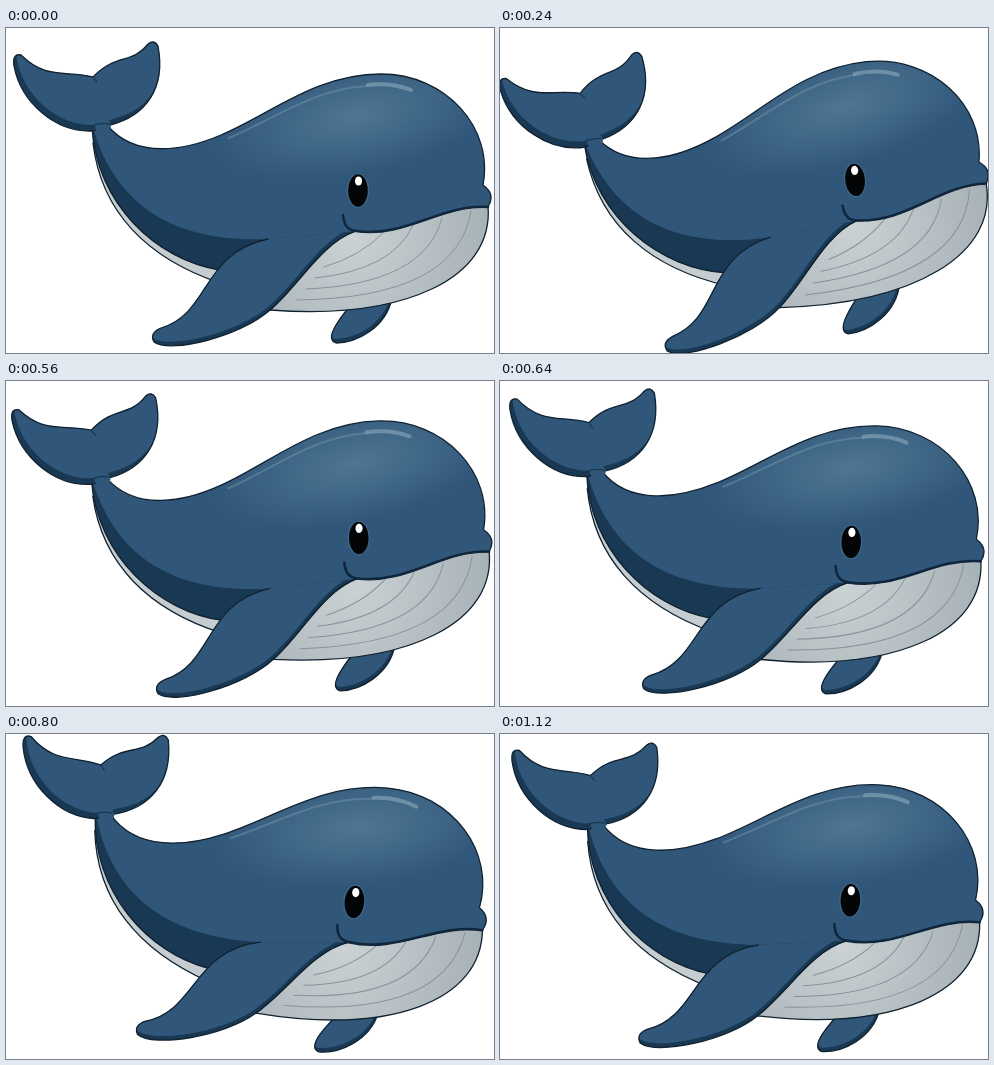
These frames come from a looping animation (488x325 px, 1.2 s). An HTML page with a canvas:

```html
<!DOCTYPE html>
<html lang="en">
<head>
<meta charset="utf-8">
<title>Swimming whale</title>
<style>
  html, body { margin: 0; width: 100%; height: 100%; overflow: hidden; background: #fff; }
  canvas { display: block; }
</style>
</head>
<body>
<canvas id="stage" width="488" height="325"></canvas>
<script>
  const ctx = document.getElementById('stage').getContext('2d');
  const LOOP = 1200, STEP = 80;
  const SKIN = '#30577a', DARK = '#193853', LINE = '#10212f';

  const shapes = {
    body: `M101 97 C130 132 180 122 215 107 C265 86 310 46 375 46 C440 46 488 100 477 157
      Q490 166 482 179 C435 176 400 210 350 203 C315 215 295 255 264 282 L214 242 C150 232 90 175 86 99 Z`,
    stripe: 'M86 99 C90 175 150 232 214 242 L262 211 C165 215 110 175 88 103 Z',
    side: 'M87 115 C95 183 140 230 214 255 L240 225 Z',
    belly: 'M482 178 C488 250 400 292 264 282 L340 190 Z',
    flipper: 'M262 211 C195 225 205 285 155 300 Q143 305 148 314 C165 326 235 308 264 282 C295 255 315 215 350 203',
    farFlipper: 'M386 270 C380 300 350 315 330 315 Q321 312 330 297 Q338 284 348 274 Z',
    tail: `M87 49 C60 42 40 52 15 27 Q6 25 8 38 C15 75 50 105 87 103 L104 97
      C140 88 160 60 152 18 Q148 11 142 16 C125 37 110 25 87 49 Z`,
    mouth: 'M337 187 C338 198 342 202 350 203 C400 210 435 176 482 179',
    backShine: 'M223 110 C270 90 310 60 362 58',
    headShine: 'M362 57 Q385 54 405 62',
    crease: 'M82 100 Q92 94 103 96',
    notch: 'M87 49 L91 54'
  };
  for (const name in shapes) shapes[name] = new Path2D(shapes[name]);

  function gradient(x, y, radius, inner, outer) {
    const g = ctx.createRadialGradient(x, y, 0, x, y, radius);
    g.addColorStop(0, inner);
    g.addColorStop(1, outer);
    return g;
  }
  const bellyFill = gradient(345, 210, 145, '#cbd2d4', '#a5b0b5');
  const shine = gradient(0, 0, 1, 'rgba(86,126,153,.8)', 'rgba(86,126,153,0)');

  function stroke(path, color = LINE, width = 1.3) {
    ctx.strokeStyle = color;
    ctx.lineWidth = width;
    ctx.stroke(path);
  }

  function fill(path, color) {
    ctx.fillStyle = color;
    ctx.fill(path);
  }

  function ellipse(x, y, rx, ry, color) {
    ctx.beginPath();
    ctx.ellipse(x, y, rx, ry, 0, 0, 2 * Math.PI);
    ctx.fillStyle = color;
    ctx.fill();
  }

  // Dark shape with a shifted light copy inside, leaving a shaded rim.
  function shaded(path, dx, dy) {
    fill(path, DARK);
    ctx.save();
    ctx.clip(path);
    ctx.translate(dx, dy);
    fill(path, SKIN);
    ctx.restore();
    stroke(path);
  }

  function drawBelly() {
    fill(shapes.side, '#c6cdd0');
    stroke(shapes.side);
    fill(shapes.belly, bellyFill);
    stroke(shapes.belly);
    for (let i = 0; i < 4; i++) {
      const groove = new Path2D();
      groove.moveTo(378 + 29 * i, 204 - 7 * i);
      groove.quadraticCurveTo(355 + 32 * i, 228 + 14 * i, 318 - 9 * i, 239 + 11 * i);
      stroke(groove, '#87939a', 1);
    }
  }

  function drawBody() {
    fill(shapes.body, SKIN);
    ctx.save();
    ctx.clip(shapes.body);
    ctx.translate(350, 88);
    ctx.rotate(-0.2);
    ctx.scale(145, 58);
    ellipse(0, 0, 1, 1, shine);
    ctx.restore();
    fill(shapes.stripe, DARK);
    stroke(shapes.body);
    stroke(shapes.backShine, 'rgba(110,148,172,.5)', 2);
    stroke(shapes.headShine, 'rgba(140,170,188,.6)', 4);
  }

  function drawTail() {
    shaded(shapes.tail, 3, -6);
    ellipse(97, 98, 8, 7, SKIN);
    stroke(shapes.crease, DARK);
    stroke(shapes.notch, DARK);
  }

  function drawFace() {
    stroke(shapes.mouth, '#10263c', 2.6);
    ellipse(352, 162.5, 11, 17.3, '#41698a');
    ellipse(352, 162.5, 9.8, 16.2, '#030506');
    ellipse(352.5, 153, 3.6, 4.6, '#fff');
  }

  const start = performance.now();
  function draw() {
    const time = (performance.now() - start) % LOOP;
    const phase = Math.floor(time / STEP) * STEP / LOOP * 2 * Math.PI;
    const bob = 1.8 * (Math.cos(phase) - 1);
    const tilt = -Math.PI / 30 * Math.sin(phase);

    ctx.clearRect(0, 0, 488, 325);
    ctx.save();
    ctx.lineCap = ctx.lineJoin = 'round';
    ctx.translate(260, 127 + bob);
    ctx.rotate(tilt);
    ctx.translate(-260, -127);
    shaded(shapes.farFlipper, -1, -4);
    drawBelly();
    drawBody();
    shaded(shapes.flipper, -1, -4);
    drawTail();
    drawFace();
    ctx.restore();
    requestAnimationFrame(draw);
  }
  draw();
</script>
</body>
</html>
```
